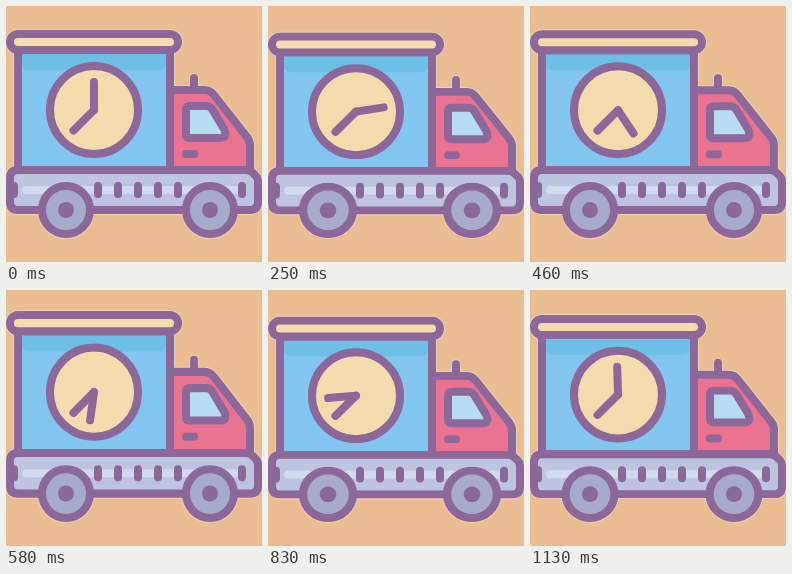
An HTML page with a canvas that plays this animation: 256 by 256 pixels, repeating every 1.21 s.

```html
<!DOCTYPE html>
<html lang="en">
<head>
<meta charset="utf-8">
<title>Delivery truck</title>
<style>
html, body { margin: 0; width: 100%; height: 100%; overflow: hidden; background: #eabc92; }
canvas { display: block; width: 100vw; height: 100vh; }
</style>
</head>
<body>
<canvas id="stage" width="256" height="256"></canvas>
<script>
const ctx = document.getElementById('stage').getContext('2d');
const LOOP = 1210, FPS = 24, GROUND = 232;
const INK = '#8c6799', HALO = '#efcfb4', CREAM = '#f2dcae', SKY = '#82c5ee',
  SHADE = '#6dbfe5', RED = '#e87290', GLASS = '#b6dcf1', STEEL = '#bdc4e0',
  SHINE = '#d3d9ee', TYRE = '#a5abc8';

// [time, lid top] and [time, minute hand in degrees]
const bounce = [[0, 24], [80, 24.6], [170, 27], [380, 26], [580, 21], [830, 26.7], [1000, 27], [1130, 25], [LOOP, 24.5]];
const turn = [[0, 0], [170, 57], [380, 120], [580, 187], [830, 264], [1000, 318], [1130, 360], [LOOP, 360]];

const linear = u => u;
const smooth = u => (1 - Math.cos(Math.PI * u)) / 2;

function track(keys, t, ease) {
  let i = 1;
  while (i < keys.length - 1 && t > keys[i][0]) i++;
  const [t0, a] = keys[i - 1], [t1, b] = keys[i];
  return a + (b - a) * ease((t - t0) / (t1 - t0));
}

function rounded(x, y, w, h, r) {
  const p = new Path2D();
  p.roundRect(x, y, w, h, r);
  return p;
}

function disc(x, y, r) {
  const p = new Path2D();
  p.arc(x, y, r, 0, Math.PI * 2);
  return p;
}

const lid = rounded(4, 28, 168, 16, 8);
const box = new Path2D('M12 44H164V164H12Z');
const band = rounded(16, 46, 144, 18, [0, 0, 6, 6]);
const cab = new Path2D('M164 84H199Q204 84 208 89L241 131Q244 135 244 139V164H164Z');
const aerial = new Path2D('M188 72V84');
const pane = new Path2D('M184 100H200Q204 100 206 103L218 123Q222 132 214 132H184Q180 132 180 128V104Q180 100 184 100Z');
const bed = new Path2D('M12 164H240Q244 164 247 167L250 170Q252 172 252 176V196Q252 204 244 204H12Q4 204 4 196V172Q4 164 12 164Z');
const face = disc(88, 104, 44);
const tyre = disc(0, 0, 24);
const hub = disc(0, 0, 8);

function outline(path, color = INK, width = 8) {
  ctx.strokeStyle = color;
  ctx.lineWidth = width;
  ctx.stroke(path);
}

function paint(path, fill) {
  ctx.fillStyle = fill;
  ctx.fill(path);
}

function part(path, fill) {
  paint(path, fill);
  outline(path);
}

function line(x1, y1, x2, y2) {
  const p = new Path2D();
  p.moveTo(x1, y1);
  p.lineTo(x2, y2);
  outline(p);
}

function onWheels(stretch, draw) {
  for (const x of [60, 204]) {
    ctx.save();
    ctx.translate(x, 204);
    ctx.scale(stretch, 1);
    draw();
    ctx.restore();
  }
}

function render(t) {
  const squash = (GROUND - track(bounce, t, smooth)) / (GROUND - 24);
  const stretch = 1 + Math.max(0, 1 - squash) * 3;
  const angle = track(turn, t, linear) * Math.PI / 180;

  ctx.setTransform(1, 0, 0, 1, 0, 0);
  paint(rounded(0, 0, 256, 256, 0), '#eabc92');
  ctx.translate(0, GROUND);
  ctx.scale(1, squash);
  ctx.translate(0, -GROUND);
  ctx.lineCap = ctx.lineJoin = 'round';

  for (const p of [lid, box, cab, aerial, bed]) outline(p, HALO, 10);
  onWheels(stretch, () => outline(tyre, HALO, 10));

  outline(aerial);
  part(cab, RED);
  part(pane, GLASS);
  line(180, 148, 188, 148);

  paint(box, SKY);
  paint(band, SHADE);
  outline(box);
  part(lid, CREAM);

  part(face, CREAM);
  line(88, 104, 67.5, 124.5);
  line(88, 104, 88 + 28 * Math.sin(angle), 104 - 28 * Math.cos(angle));

  paint(bed, STEEL);
  paint(rounded(16, 180, 220, 8, 4), SHINE);
  outline(bed);
  for (const x of [8, 92, 112, 132, 152, 172, 236]) line(x, 180, x, 188);

  onWheels(stretch, () => {
    part(tyre, TYRE);
    paint(hub, INK);
  });
}

function tick(now) {
  const t = now % LOOP;
  // the pose advances at film rate and rests at the start of the loop
  const frame = Math.floor((t + 4) * FPS / 1000);
  render(frame < 2 ? 0 : Math.min(frame, 27) * 1000 / FPS);
  requestAnimationFrame(tick);
}

render(0);
requestAnimationFrame(tick);
</script>
</body>
</html>
```
